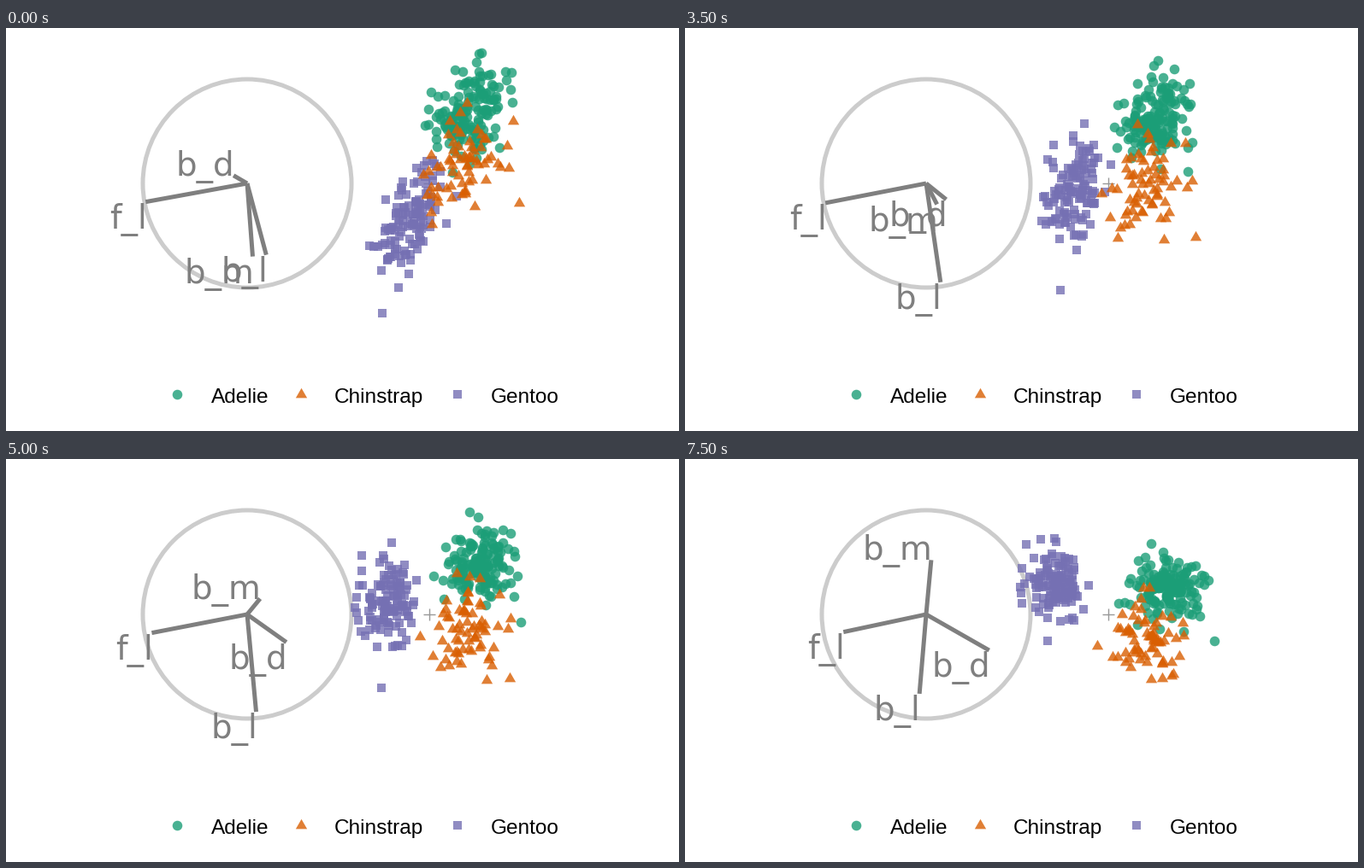
Recreate the animation shown at these times as a matplotlib script. Size 787 px wide and 472 px high, loop 8000 ms.

```python
import numpy as np
import matplotlib.pyplot as plt
from matplotlib.animation import FuncAnimation

W, H, DPI = 787, 472, 100
PX = 72 / DPI
HUB = np.array([282, 182])      # centre of the axis circle
ORIGIN = np.array([495, 182])   # centre of the point cloud
RADIUS = 122
GREY = "#7f7f7f"
LABELS = ["b_l", "b_d", "f_l", "b_m"]
rng = np.random.default_rng(4)


def frame(*tips):
    """Nearest orthonormal 4x2 projection whose axes end at these tips."""
    u, _, vt = np.linalg.svd((np.array(tips) - HUB) / RADIUS, full_matrices=False)
    return u @ vt


# The tour runs along geodesics between these projections
STEPS = [0, 12, 13]
STOPS = [
    frame((304, 264), (266, 173), (162, 204), (288, 266)),
    frame((282.5, 269), (355, 223), (185, 201.5), (299, 111)),
    frame((274, 274), (355, 224), (186, 202), (288, 119)),
]


def geodesic(a, b, t):
    """Rotate plane a towards plane b through their principal angles."""
    va, cosines, vbt = np.linalg.svd(a.T @ b)
    ga, gb = a @ va, b @ vbt.T
    angle = np.arccos(np.clip(cosines, -1, 1))
    side = gb - ga * cosines
    side /= np.linalg.norm(side, axis=0)
    return (ga * np.cos(angle * t) + side * np.sin(angle * t)) @ va.T


def basis(step):
    k = 0 if step <= STEPS[1] else 1
    t = (step - STEPS[k]) / (STEPS[k + 1] - STEPS[k])
    return geodesic(STOPS[k], STOPS[k + 1], t)


def cloud(n, mean, sd, load, loner=None):
    """Correlated group: two halves sharing one size factor, plus a far point."""
    size = np.where(np.arange(n) % 2, 0.8, -0.8) + rng.normal(0, 0.55, n)
    noise = np.clip(rng.normal(size=(n, 4)), -2.2, 2.2)
    z = load * size[:, None] + np.sqrt(1 - load ** 2) * noise
    z = (z - z.mean(0)) / z.std(0)
    points = np.array(mean) + z * np.array(sd)
    return points if loner is None else np.vstack([points, loner])


GROUPS = {
    "Adelie": cloud(146, (-63, 26, -65, -38), (20, 29, 22, 26), 0.55),
    "Gentoo": cloud(118, (2, -61, 34, 43), (22, 24, 21, 28), 0.74,
                    (96, -9, 81, 102)),
    "Chinstrap": cloud(67, (15, 23, -42, -33), (24, 28, 25, 22), 0.7,
                       (90, 11, -94, -30)),
}
STYLE = {
    "Adelie": ("o", 11.6, "#1b9e77"),
    "Gentoo": ("s", 10.8, "#7570b3"),
    "Chinstrap": ((3, 0, 0), 15.4, "#d95f02"),
}
LEGEND = {"Adelie": (200, 240), "Chinstrap": (345, 384), "Gentoo": (527.5, 567)}

fig = plt.figure(figsize=(W / DPI, H / DPI), dpi=DPI, facecolor="white")
ax = fig.add_axes([0, 0, 1, 1])
ax.set(xlim=(0, W), ylim=(H, 0))
ax.axis("off")


def markers(name, x, y):
    shape, size, color = STYLE[name]
    return ax.plot(x, y, ls="", marker=shape, ms=size * PX, mfc=color,
                   mew=0, alpha=0.8, zorder=4)[0]


ax.add_patch(plt.Circle(HUB, RADIUS, fill=False, ec="#cccccc", lw=5 * PX, zorder=1))
ax.plot(*ORIGIN, "+", ms=14 * PX, mew=1.4 * PX, color="#999999", zorder=2)

spokes = [ax.plot([], [], color=GREY, lw=5 * PX, solid_capstyle="butt",
                  zorder=3)[0] for _ in LABELS]
names = [ax.text(0, 0, s, family="DejaVu Sans", size=38.8 * PX, color=GREY,
                 ha="right", va="baseline", zorder=3) for s in LABELS]
dots = {name: markers(name, [], []) for name in GROUPS}

for name, (mark_x, text_x) in LEGEND.items():
    markers(name, [mark_x], [429.2])
    ax.text(text_x, 439, name, family="Liberation Sans", size=24.4 * PX,
            color="black", ha="left", va="baseline")


def update(i):
    view = basis(max(0, i - 2))   # the first view is held for three frames
    for (x, y), spoke, label in zip(HUB + RADIUS * view, spokes, names):
        spoke.set_data([HUB[0], x], [HUB[1], y])
        label.set_position((x + 1.5, y if y < HUB[1] else y + 31))
    for name, data in GROUPS.items():
        dots[name].set_data(*(ORIGIN + data @ view).T)
    return [*spokes, *names, *dots.values()]


anim = FuncAnimation(fig, update, frames=16, interval=500, repeat=True)
plt.show()
```
